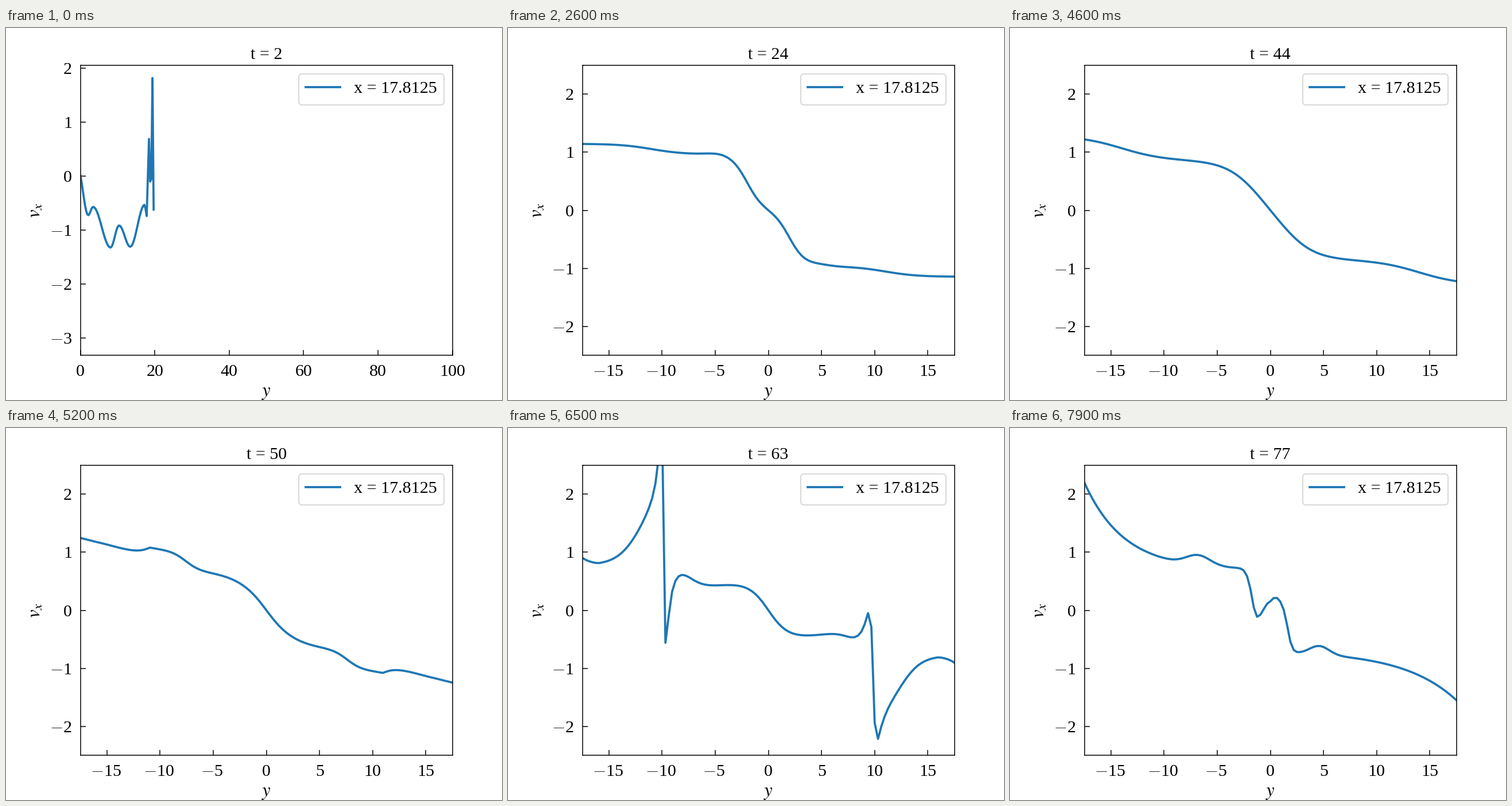
A matplotlib script that plays this animation: 864 by 648 pixels, repeating every 8 s.

```python
import numpy as np
import matplotlib.pyplot as plt
from matplotlib.animation import FuncAnimation
from matplotlib.patches import FancyBboxPatch

W, H, DPI = 864, 648, 135
STEP = 0.3125
BLUE = "#1f77b4"

plt.rcParams["font.family"] = "Liberation Serif"
plt.rcParams["mathtext.fontset"] = "cm"

Y = np.arange(-57, 58) * STEP
R = np.abs(Y)
SIDE = np.sign(Y)
EDGE = np.clip((R - 11) / 5, 0, 1)


def ramp(c, w):
    """Odd rise from -1 to 1 in two soft steps at -c and c."""
    return (np.tanh((Y - c) / w) + np.tanh((Y + c) / w)) / 2


def bump(c, w):
    return np.exp(-((Y - c) / w) ** 2)


def shear(height, width, n=2.2):
    return -height * Y / (R ** n + width ** n) ** (1 / n)


def jets(p):
    """A sharp swing of sign at -p and at p."""
    left, right = Y + p, Y - p
    return -1.5 * (left / (left ** 2 + .04) + right / (right ** 2 + .12))


def waypoints(points, x):
    """Cosine easing from each turning point to the next."""
    px, py = np.array(points).T
    i = np.clip(np.searchsorted(px, x, side="right") - 1, 0, len(px) - 2)
    s = (x - px[i]) / (px[i + 1] - px[i])
    return py[i] + (py[i + 1] - py[i]) * (1 - np.cos(np.pi * s)) / 2


OPEN_Y = np.arange(64) * STEP
OPEN_V = waypoints([(-.7, .14), (2.1, -.725), (3.4, -.57), (8.1, -1.325),
                    (10.4, -.915), (13.4, -1.31), (17.3, -.53),
                    (17.8125, -.74), (18.4375, .69), (18.75, -.1),
                    (19.0625, -.05), (19.375, 1.82), (19.6875, -.62)], OPEN_Y)

SHEAR = (shear(1.055, .8) + .004 * np.sin(4 * Y)
         - .03 * SIDE * (R > 17.1))
WIDE = (-.965 * ramp(2, 1.5) - .18 * ramp(11, 3)
        + .025 * (bump(-4.7, 1.5) + bump(4.7, 1.5)))
SLOPED = -.855 * ramp(1.5, 3) - .43 * ramp(14, 4)
STEPPED = (-.455 * np.tanh(Y / 1.7) - .77 * ramp(7.6, 1.4)
           - SIDE * np.exp((R - 15.25) / 1.3))
WAVY = -.58 * np.tanh(Y / 2) + .7 * bump(-10, 2.7) - .5 * bump(10.9, 2.3)
CALM = (-.7 * ramp(1.65, .4) + .25 * bump(.5, .9) - .25 * bump(-1.5, .7)
        + .17 * bump(-6.8, 1.6) + .15 * bump(4.6, 1.3)
        + np.where(Y < 0, 1.5 * np.exp((R - 17.5) / 3.7),
                   -.85 * np.exp((R - 17.5) / 5)))


def linear(s):
    return s


def late_edges(s):
    return s ** (1 + 6 * EDGE)


def early_edges(s):
    return 1 - (1 - s) ** (1 + 4 * EDGE)


# time, profile, easing on the way to the next profile
KEYS = [(0, shear(1.0, .3), linear), (11, SHEAR, linear),
        (24, WIDE, linear), (44, SLOPED, late_edges),
        (57, STEPPED, early_edges), (69, WAVY, linear), (77, CALM, linear)]


def profile(t):
    for (t0, a, ease), (t1, b, _) in zip(KEYS, KEYS[1:]):
        if t <= t1:
            break
    s = (t - t0) / (t1 - t0)
    v = a + (b - a) * ease(s)
    if 25 < t < 35:
        swell = 2.8 * np.sin(np.pi * (t - 25) / 10)
        v = v - SIDE * swell * np.exp((R - 17.5) / 1.5)
    elif 57 < t <= 69:
        v = v + s * jets(17.5 - 15.3 * s)
    elif t > 69:
        v = v + (1 - s) ** 2.5 * jets(2.2)
    return v


fig = plt.figure(figsize=(W / DPI, H / DPI), dpi=DPI, facecolor="white")
ax = fig.add_axes([.15, .12, .75, .78])
ax.tick_params(direction="in", length=5, width=.8,
               labelbottom=False, labelleft=False)
curve, = ax.plot([], [], color=BLUE, lw=2)

# overlay in pixel units, y pointing down
top = fig.add_axes([0, 0, 1, 1], zorder=2)
top.set(xlim=(0, W), ylim=(H, 0))
top.axis("off")


def put(x, y, s, ha="center", size=16, **kw):
    return top.text(x, y, s, ha=ha, va="baseline", fontsize=size, **kw)


title = put(453.6, 54, "")
put(453.6, 641, "$y$", size=17.5, math_fontfamily="stix")
put(60, 317.5, "$v_x$", size=17.5, math_fontfamily="stix", rotation=90,
    rotation_mode="anchor")
top.add_patch(FancyBboxPatch((516, 86), 241, 42, lw=1, fc="white", ec="0.8",
                             alpha=.8,
                             boxstyle="round,pad=6,rounding_size=6"))
top.plot([522, 581.5], [102.7, 102.7], color=BLUE, lw=2)
put(605.5, 113, "x = 17.8125", ha="left")


def number(n):
    return f"$-${-n}" if n < 0 else str(n)


class Scale:
    """Limits, ticks and tick labels of one view."""

    def __init__(self, xlim, ylim, xticks, yticks):
        self.view = dict(xticks=xticks, yticks=yticks, xlim=xlim, ylim=ylim)
        self.labels = []
        for n in xticks:
            x = 129.6 + 648 * (n - xlim[0]) / (xlim[1] - xlim[0])
            self.labels.append(put(x - 2 * (n < 0), 606, number(n)))
        for n in yticks:
            y = 570.24 - 505.44 * (n - ylim[0]) / (ylim[1] - ylim[0])
            self.labels.append(put(115, y + 10, number(n), ha="right"))

    def show(self, on):
        for label in self.labels:
            label.set_visible(on)
        if on:
            ax.set_xticks(self.view["xticks"])
            ax.set_yticks(self.view["yticks"])
            ax.set(xlim=self.view["xlim"], ylim=self.view["ylim"])


opening = Scale((0, 100), (-3.325, 2.058), range(0, 101, 20), range(-3, 3))
main = Scale((-17.5, 17.5), (-2.5, 2.5), range(-15, 16, 5), range(-2, 3))


def draw(i):
    first = i < 2
    t = 2 if first else i - 2
    opening.show(first)
    main.show(not first)
    if first:
        curve.set_data(OPEN_Y, OPEN_V)
    else:
        curve.set_data(Y, profile(t))
    title.set_text(f"t = {t}")
    return curve, title


anim = FuncAnimation(fig, draw, frames=80, interval=100, repeat=True,
                     repeat_delay=0, init_func=lambda: draw(0), blit=False)
plt.show()
```
